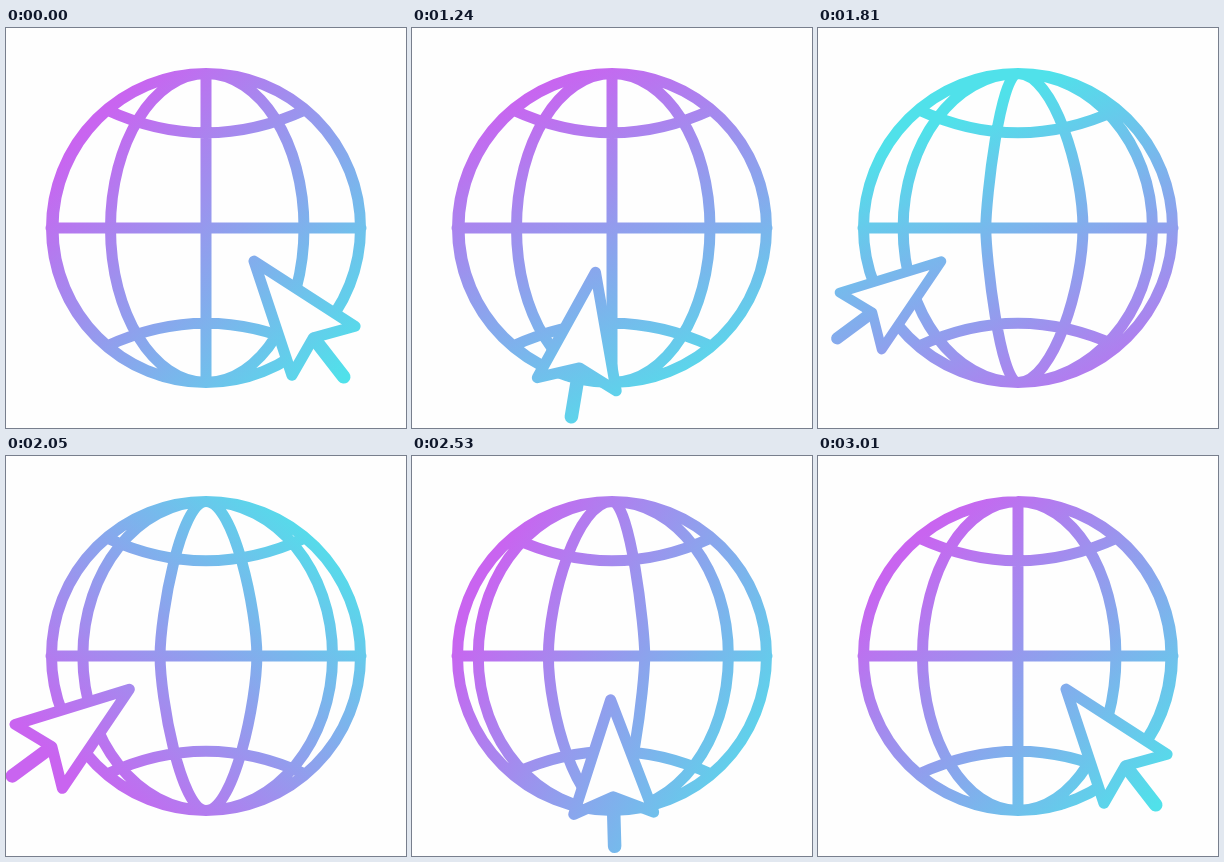
Write an HTML page with a canvas that moves like this. It is 400x400 px and loops after 3.04 s.

```html
<!DOCTYPE html>
<html lang="en">
<head>
<meta charset="utf-8">
<title>Globe and pointer</title>
<style>
  html, body { margin: 0; width: 100%; height: 100%; overflow: hidden; background: #fefefe; }
  canvas { display: block; width: 100vmin; height: 100vmin; margin: 0 auto; }
</style>
</head>
<body>
<canvas></canvas>
<script>
const LOOP = 3040, START = 1030, STEP = 30;
const PAPER = '#fefefe', PURPLE = '#c964f0', CYAN = '#50e1ea';
const R = 154.5, K = 0.552, LINE = 11;
const MERIDIANS = [-153, -95.5, 0, 98, 153];

const canvas = document.querySelector('canvas');
const ctx = canvas.getContext('2d');

const lerp = (a, b, k) => a + (b - a) * k;
const clamp = v => Math.min(1, Math.max(0, v));

// Cubic bezier ease (1/3, 0, 1/3, 1)
function ease(u) {
  u = clamp(u);
  let lo = 0, hi = 1;
  for (let i = 0; i < 24; i++) {
    const s = (lo + hi) / 2;
    if (s - s * s + s * s * s < u) lo = s; else hi = s;
  }
  return lo * lo * (3 - 2 * lo);
}

const phase = (t, from, to) => ease((t - from) / (to - from));

function makePaint(t) {
  const turn = 2 * Math.PI * phase(t, 1000, 3000);
  const angle = Math.PI / 4 + turn;
  const mid = 0.55 - 0.12 * Math.cos(turn) + 0.05 * Math.sin(turn);
  const len = 357, dx = Math.cos(angle) * len, dy = Math.sin(angle) * len;
  const g = ctx.createLinearGradient(
    200 - dx * mid, 200 - dy * mid,
    200 + dx * (1 - mid), 200 + dy * (1 - mid));
  g.addColorStop(0, PURPLE);
  g.addColorStop(1, CYAN);
  return g;
}

// Handles of one meridian: bulge and mid-handle height
const shape = x => ({ x, h: x ? K * R : 0 });

function meridian(a, b, k) {
  const p = shape(a), q = shape(b);
  const x = lerp(p.x, q.x, k), h = lerp(p.h, q.h, k);
  ctx.moveTo(200, 200 - R);
  ctx.bezierCurveTo(200 + x * K, 200 - R, 200 + x, 200 - h, 200 + x, 200);
  ctx.bezierCurveTo(200 + x, 200 + h, 200 + x * K, 200 + R, 200, 200 + R);
}

function drawGlobe(t) {
  const spin = 6 * phase(t, 1556, 3026);
  const k = spin % 1;
  ctx.beginPath();
  ctx.arc(200, 200, R, 0, 2 * Math.PI);
  ctx.moveTo(45, 200);
  ctx.lineTo(355, 200);
  for (const side of [-1, 1]) {
    ctx.moveTo(101, 200 + side * 118);
    ctx.quadraticCurveTo(200, 200 + side * 72.5, 299, 200 + side * 118);
  }
  for (let i = 0; i < 4; i++) meridian(MERIDIANS[i], MERIDIANS[i + 1], k);
  ctx.lineWidth = LINE;
  ctx.stroke();
}

function pointerPose(t) {
  const q = phase(t, 1000, 1625) - phase(t, 2172, 3005);
  const deg = lerp(-37.8, 53.5, q);
  const press = phase(t, 1600, 1830) - phase(t, 1850, 2110);
  return {
    x: 196.4 - 1.364 * deg,
    y: 244.3 - 0.00534 * (deg - 8) ** 2,
    angle: deg * Math.PI / 180,
    scale: 1 - 0.115 * press
  };
}

// Rotates the points by hand so that the gradient stays in stage space
function drawPointer(t) {
  const p = pointerPose(t);
  const c = Math.cos(p.angle) * p.scale, s = Math.sin(p.angle) * p.scale;
  const at = (x, y) => [p.x + x * c - y * s, p.y + x * s + y * c];

  ctx.beginPath();
  ctx.moveTo(...at(0, 0));
  ctx.lineTo(...at(40, 113.5));
  ctx.lineTo(...at(0, 97));
  ctx.lineTo(...at(-40, 113.5));
  ctx.closePath();
  ctx.fillStyle = PAPER;
  ctx.fill();
  ctx.lineWidth = LINE * p.scale;
  ctx.stroke();

  ctx.beginPath();
  ctx.moveTo(...at(0, 99));
  ctx.lineTo(...at(0, 146.5));
  ctx.lineWidth = 13.5 * p.scale;
  ctx.stroke();
}

function draw(t) {
  const size = Math.round(Math.min(innerWidth, innerHeight) * (devicePixelRatio || 1)) || 400;
  if (canvas.width !== size) canvas.width = canvas.height = size;
  ctx.setTransform(size / 400, 0, 0, size / 400, 0, 0);
  ctx.fillStyle = PAPER;
  ctx.fillRect(0, 0, 400, 400);
  ctx.lineCap = ctx.lineJoin = 'round';
  ctx.strokeStyle = makePaint(t);
  drawGlobe(t);
  drawPointer(t);
}

const begin = performance.now();

function frame() {
  const t = Math.max(0, performance.now() - begin) % LOOP;
  draw(t < START ? 0 : START + Math.floor((t - START) / STEP) * STEP);
  requestAnimationFrame(frame);
}
frame();
</script>
</body>
</html>
```
